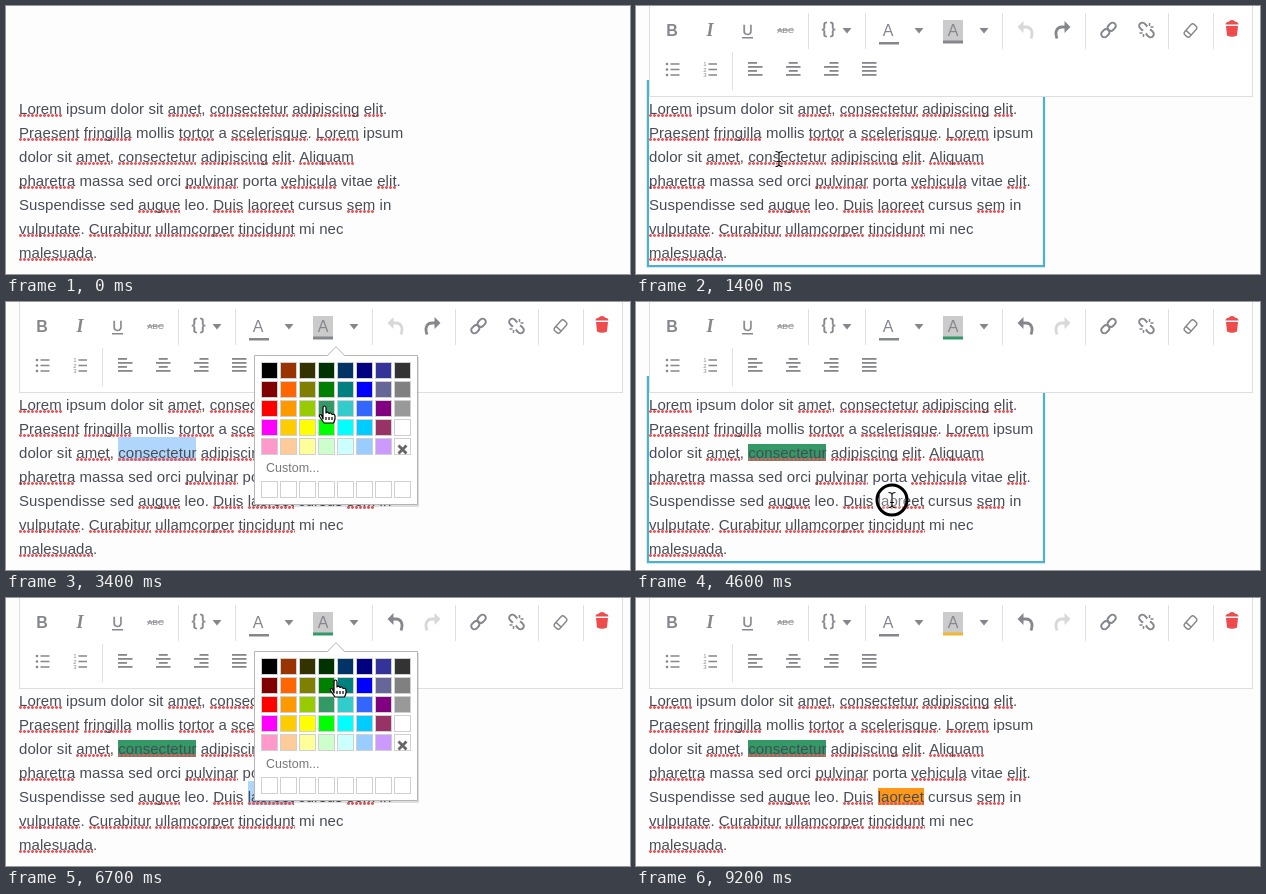
An HTML page for the animation above (9300 ms loop, 624 px wide and 268 px high).

```html
<!DOCTYPE html>
<html lang="en">
<head>
<meta charset="utf-8">
<title>Text editor background color</title>
<style>
  html, body { margin: 0; width: 100%; height: 100%; overflow: hidden; background: #fdfdfd; }
  #stage { position: relative; width: 624px; height: 268px; overflow: hidden; }
  #copy { position: absolute; left: 13px; top: 91px; font: 15px/24px "Liberation Sans", Arial, sans-serif; letter-spacing: .055px; color: #484c55; white-space: nowrap; }
  u { text-decoration: none; background: radial-gradient(circle at 1.5px 1.5px, #e8575b 1px, #e8575b00 1.8px) 0 100% / 4px 3px repeat-x; }
  #strip { position: absolute; left: 13px; top: 88px; width: 37px; height: 4px; background: #b0d6fc; }
  svg { position: absolute; left: 0; top: 0; font-family: "Liberation Sans", Arial, sans-serif; }
</style>
</head>
<body>
<div id="stage">
  <div id="copy"><u>Lorem</u> ipsum dolor sit <u>amet</u>, <u>consectetur</u> <u>adipiscing</u> <u>elit</u>.<br>
    <u>Praesent</u> <u>fringilla</u> mollis <u>tortor</u> a <u>scelerisque</u>. <u>Lorem</u> ipsum<br>
    dolor sit <u>amet</u>, <u id="first">consectetur</u> <u>adipiscing</u> <u>elit</u>. <u>Aliquam</u><br>
    <u>pharetra</u> massa sed orci <u>pulvinar</u> porta <u>vehicula</u> vitae <u>elit</u>.<br>
    Suspendisse sed <u>augue</u> leo. <u>Duis</u> <u id="second">laoreet</u> cursus <u>sem</u> in<br>
    <u>vulputate</u>. <u>Curabitur</u> <u>ullamcorper</u> <u>tincidunt</u> mi nec<br>
    <u>malesuada</u>.</div>
  <div id="strip"></div>

  <svg width="624" height="268" viewBox="0 0 624 268">
    <defs>
      <path id="caret" d="M-4.5-2.5h9L0 3z"/>
      <g id="bend" fill="none" stroke="currentColor" stroke-width="2.8">
        <path d="M-4-3.5H0C5-3.5 7.500 1 5 8"/>
        <path d="M-8.500-3.500L-2.500-9.500V2.500z" fill="currentColor" stroke="none"/>
      </g>
      <g id="chain" fill="none" stroke="#85878c" stroke-width="2">
        <rect x="-9" y="-3.200" width="9" height="6.400" rx="3.200"/>
        <rect x="0" y="-3.200" width="9" height="6.400" rx="3.200"/>
      </g>
    </defs>

    <path id="frame" fill="none" stroke="#4bb1cf" stroke-width="2.200"/>

    <g id="bar">
      <rect x="13.500" y="-1.500" width="603" height="92" fill="#fff" stroke="#dedede"/>
      <path d="M172.500 7V43M229.500 7V43M366.500 7V43M449.500 7V43M532.500 7V43M577.500 7V43M96.500 46V84" stroke="#e0e0e0"/>
      <g fill="#85878c" text-anchor="middle">
        <text x="36" y="30" font-size="16" font-weight="bold">B</text>
        <text x="74" y="30" font-size="18" font-weight="bold" font-style="italic" font-family="Liberation Serif, serif">I</text>
        <text x="111.500" y="29" font-size="14" stroke="#85878c" stroke-width=".4">U</text>
        <path d="M106 31h11v1.500h-11zM141 23.500h17v1h-17z"/>
        <text x="149.500" y="27" font-size="8">ABC</text>
        <text x="194" y="27.500" font-size="16" stroke="#85878c" stroke-width=".5" letter-spacing="3">{}</text>
        <use href="#caret" x="211" y="24.500"/>
        <use href="#caret" x="283" y="24.500"/>
        <text x="252" y="30" font-size="16">A</text>
        <path d="M243 36h20v2.500h-20z"/>
        <g id="hover">
          <rect x="299.500" y="7.500" width="62" height="36" rx="1" fill="#fafafa" stroke="#4a4a4a"/>
          <path d="M334.500 8v35" stroke="#333"/>
        </g>
        <path d="M307 14h20v21h-20z" fill="#cbcbcb"/>
        <text x="317" y="30" font-size="16">A</text>
        <rect id="ink" x="307" y="34.500" width="20" height="3"/>
        <use id="drop" href="#caret" x="348" y="24.500"/>
        <use id="undo" href="#bend" x="390" y="24.500"/>
        <use id="redo" href="#bend" transform="translate(426 24.500) scale(-1 1)"/>
        <use href="#chain" transform="translate(472.500 24) rotate(-45)"/>
        <g transform="translate(510.500 24)">
          <use href="#chain" transform="rotate(45)"/>
          <path d="M-5 5L5-5" stroke="#fff" stroke-width="4"/>
          <path d="M-7 3h3M-3 7V4M7-3H4M3-7v3" stroke="#85878c" stroke-width="1.500"/>
        </g>
        <g transform="translate(554.500 24.500) rotate(-48)" fill="none" stroke="#85878c" stroke-width="1.400">
          <rect x="-7" y="-3.500" width="14" height="7" rx="2.500"/><path d="M-3-3.500v7"/>
        </g>
        <path d="M589.500 18.500Q589.500 16 593 15.500Q593.500 14 596 14T599 15.500Q602.500 16 602.500 18.500zM590 20h12l-1 9.500Q596 32 591 29.500z" fill="#ee4b4c"/>
        <g id="lists" font-size="6"></g>
      </g>
    </g>

    <g id="tip">
      <rect x="278" y="48" width="104" height="21" rx="3" fill="#303030"/>
      <path d="M325 49l5-5 5 5z" fill="#303030"/>
      <text x="330" y="62.500" font-size="11.300" fill="#fff" stroke="#fff" stroke-width=".35" text-anchor="middle">Background color</text>
    </g>

    <g id="panel">
      <rect x="249" y="55" width="164" height="150" fill="#000" opacity=".12"/>
      <path d="M248.500 53.500H321.500L330 44.500L338.500 53.500H411.500V202.500H248.500z" fill="#fff" stroke="#b4b4b4"/>
      <g id="swatches" stroke="#d0d0d0"></g>
      <path d="M392.500 143.500l8 8m0-8l-8 8" stroke="#666" stroke-width="2.800"/>
      <text x="260" y="170" font-size="12.500" fill="#777">Custom...</text>
    </g>

    <g id="pointer">
      <circle id="ring" r="15" fill="#fff4" stroke="#000" stroke-width="3"/>
      <g id="beam" fill="none">
        <path d="M-3.500-7.500Q0-7.500 0-5V5Q0 7.500-3.500 7.500M3.500-7.500Q0-7.500 0-5V5Q0 7.500 3.500 7.500M-2 2.500h4" stroke="#fff" stroke-width="2.600" opacity=".7"/>
        <path d="M-3.500-7.500Q0-7.500 0-5V5Q0 7.500-3.500 7.500M3.500-7.500Q0-7.500 0-5V5Q0 7.500 3.500 7.500M-2 2.500h4" stroke="#111" stroke-width="1.200"/>
      </g>
      <g id="hand" stroke="#000" stroke-width="1.200" stroke-linejoin="round">
        <path d="M-3 8V-3Q-3-5-1.500-5T0-3V2Q1.500 0 3 2.500Q5 1 6 3.500Q9 2.500 9 5.500V8Q8.500 10 7.500 12H-2L-6.500 5.500Q-7 3-4.500 4z" fill="#fff"/>
        <path d="M0 6v3M3 6v3M6 6v3" fill="none"/>
      </g>
    </g>
  </svg>
</div>

<script>
const LOOP = 9300, GREEN = '#339966', BLUE = '#b0d6fc', GRAY = '#85878c', PALE = '#d8d8d8';
const $ = id => document.getElementById(id);
const show = (id, on) => { $(id).style.display = on ? '' : 'none'; };
const within = (t, from, to) => t >= from && t < to;

// Second toolbar row: two lists, then four alignments.
let icons = '';
for (let row = 0; row < 3; row++) {
  const y = 58 + row * 5.5;
  icons += `<circle cx="31" cy="${y}" r="1.3"/><path d="M34.5 ${y - .7}h9v1.4h-9zM72.5 ${y - .7}h8.5v1.4h-8.5z"/><text x="69" y="${y + 2}">${row + 1}</text>`;
}
[112, 150, 188, 226].forEach((x, kind) => {
  for (let row = 0; row < 4; row++) {
    const w = kind == 3 || row % 2 ? 14.5 : 9;
    const dx = (14.5 - w) * [0, .5, 1, 0][kind];
    icons += `<path d="M${x + dx} ${56 + row * 4}h${w}v1.8h-${w}z"/>`;
  }
});
$('lists').innerHTML = icons;

const palette = `000 930 330 030 036 000080 339 333
  800000 f60 808000 008000 008080 00f 669 808080
  f00 f90 9c0 396 3cc 36f 800080 999
  f0f fc0 ff0 0f0 0ff 0cf 936 fff
  f9c fc9 ff9 cfc cff 9cf c9f fff`.split(/\s+/);
const cell = (i, y, color) => `<rect x="${255.5 + i % 8 * 19}" y="${y}" width="16" height="16" fill="${color}"/>`;
$('swatches').innerHTML = palette.map((c, i) => cell(i, 60.5 + (i >> 3) * 19, '#' + c)).join('')
  + Array.from({ length: 8 }, (_, i) => cell(i, 179.5, '#fff')).join('');

// Pointer path: time, x, y.
const path = [
  [100, 405, 225], [500, 215, 190], [700, 215, 190], [1000, 143, 170], [1100, 143, 153],
  [1700, 143, 153], [2200, 352, 38], [2600, 352, 38], [3200, 320, 109], [3700, 320, 109],
  [4200, 256, 198], [5000, 256, 198], [5600, 354, 38], [6400, 354, 38], [7000, 308, 136],
  [7100, 284, 104], [7900, 284, 104], [8200, 350, 225], [8400, 350, 225], [8700, 430, 240]
];
const clicks = [[500, 700], [1500, 1700], [2300, 2500], [3500, 3700], [4500, 4800], [6100, 6300], [7200, 7400], [8200, 8400]];

function pointerAt(t) {
  const i = path.findIndex(p => p[0] > t);
  if (i < 1) return path[i ? path.length - 1 : 0].slice(1);
  const [t0, x0, y0] = path[i - 1], [t1, x1, y1] = path[i];
  const k = (t - t0) / (t1 - t0), e = k * k * (3 - 2 * k);
  return [x0 + (x1 - x0) * e, y0 + (y1 - y0) * e];
}

function mark(id, color, selected, mixed) {
  const style = $(id).style;
  style.backgroundColor = selected ? (color ? mixed : BLUE) : color;
  style.boxShadow = selected ? `0 -7px ${BLUE}` : '';
}

function draw(now) {
  const t = Math.floor(now % LOOP / 100) * 100;
  const [x, y] = pointerAt(t);
  const visible = within(t, 100, 8700);
  const open = within(t, 2500, 3600) || within(t, 6200, 7300);
  const overText = visible && !open && x < 409 && y > 90;
  const hover = visible && !open && x > 299 && x < 362 && y < 44;
  const edited = t >= 3600, recolored = t >= 7300;

  show('bar', t >= 700);
  show('frame', overText);
  $('frame').setAttribute('d', `M11.9 ${recolored ? 89 : 75}H408V260.2H11.9z`);
  show('strip', within(t, 7300, 8200));
  show('hover', hover);
  show('tip', hover);
  show('panel', open);
  $('drop').setAttribute('fill', hover ? '#222' : GRAY);
  $('ink').setAttribute('fill', recolored ? '#f2b632' : edited ? GREEN : GRAY);
  $('undo').style.color = edited ? GRAY : PALE;
  $('redo').style.color = edited ? PALE : GRAY;

  mark('first', edited ? GREEN : '', within(t, 1600, 4500), '#6a9e9c');
  mark('second', recolored ? '#ff9719' : '', within(t, 4700, 8200), '#b39a88');

  show('pointer', visible);
  $('pointer').setAttribute('transform', `translate(${x} ${y})`);
  show('ring', clicks.some(c => within(t, ...c)));
  show('beam', overText);
  show('hand', !overText);
}

const start = performance.now();
(function tick() {
  draw(performance.now() - start);
  requestAnimationFrame(tick);
})();
</script>
</body>
</html>
```
